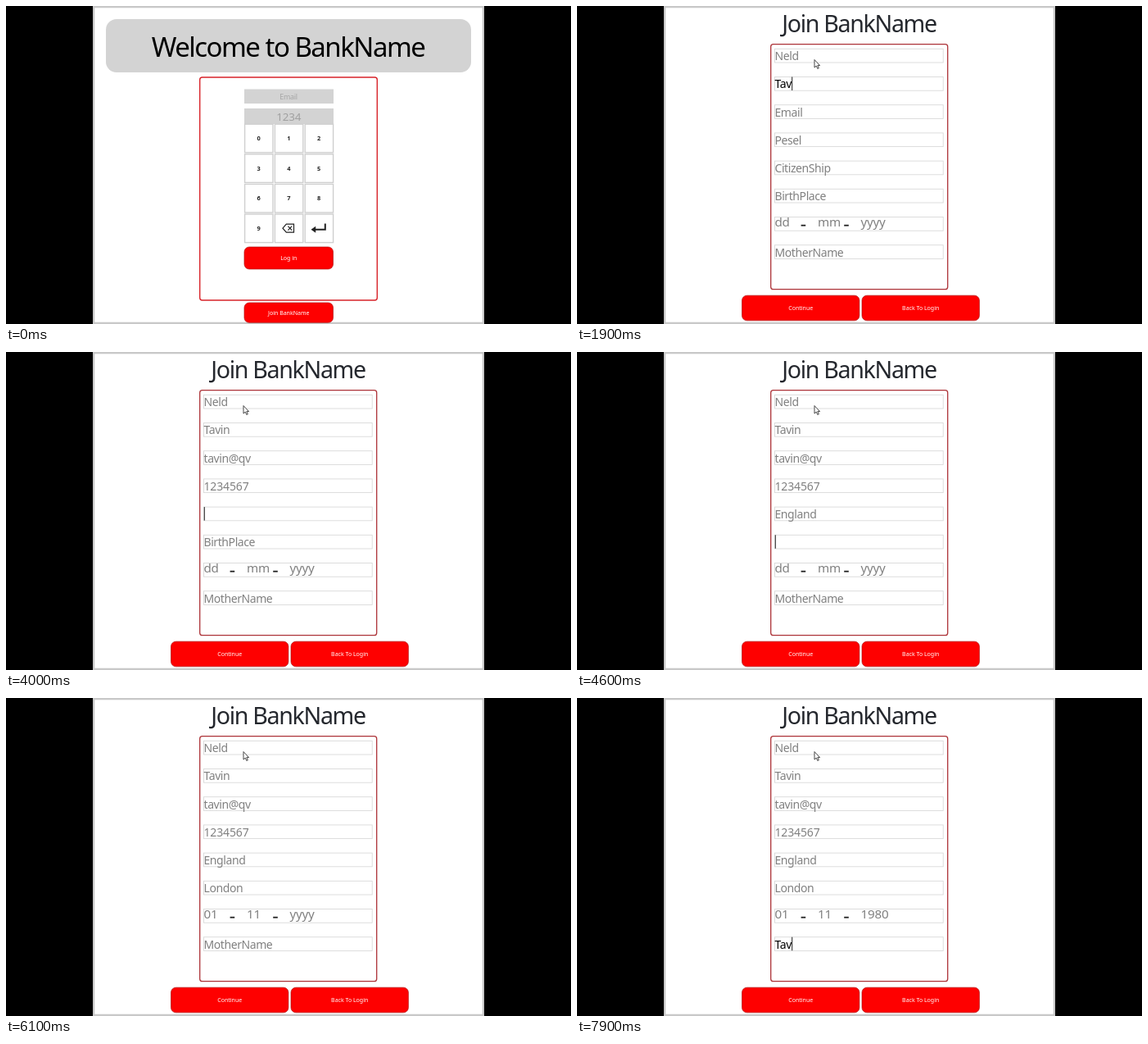
An HTML page for the animation above (8000 ms loop, 690 px wide and 388 px high).

```html
<!DOCTYPE html>
<html lang="en">
<head>
<meta charset="utf-8">
<title>Sign-up form</title>
<style>
  html, body { margin: 0; width: 100%; height: 100%; overflow: hidden; background: #000; }
  svg { display: block; width: 690px; height: 388px; }
  text { font-family: "Noto Sans", "Open Sans", sans-serif; letter-spacing: -.03em; white-space: pre; }
  .mid { text-anchor: middle; }
  .title { letter-spacing: -.046em; }
  .label { font-size: 7px; letter-spacing: 0; fill: #fff; }
  .key { font-size: 7.4px; font-weight: 600; letter-spacing: 0; fill: #222; }
  .entry { font-size: 14px; }
  .digits { letter-spacing: -.01em; }
  .date { font-size: 15.2px; letter-spacing: -.012em; fill: #808080; }
  .dash { fill: #222; }
</style>
</head>
<body>
<svg id="stage" viewBox="0 0 690 388">
  <rect width="690" height="388"/>
  <rect x="106" width="478" height="388" fill="#c9c9c9"/>
  <rect x="108.3" y="2.3" width="473.4" height="383.4" fill="#fff"/>
  <g id="login"></g>
  <g id="join"></g>
  <path id="pointer" d="M0 0V9.6L2.2 7.6 3.8 11 5.3 10.3 3.8 7.1H6.6Z" fill="#fff" stroke="#333" stroke-width=".9"/>
</svg>
<script>
const LOOP = 8000, STEP = 100;
const $ = id => document.getElementById(id);
const login = $('login'), join = $('join'), pointer = $('pointer');

function add(parent, tag, attrs, content) {
  const el = document.createElementNS('http://www.w3.org/2000/svg', tag);
  for (const k in attrs) el.setAttribute(k, attrs[k]);
  if (content) el.textContent = content;
  parent.append(el);
  return el;
}
const box = (parent, x, y, width, height, attrs) =>
  add(parent, 'rect', { x, y, width, height, ...attrs });
const label = (parent, x, y, content, attrs) =>
  add(parent, 'text', { x, y, ...attrs }, content);

function button(parent, x, y, w, h, content) {
  box(parent, x, y, w, h, { rx: 6, fill: '#fe0000', stroke: '#b01010', 'stroke-width': .7 });
  label(parent, x + w / 2, y + h / 2 + 2.5, content, { class: 'label mid' });
}

function buildLogin() {
  box(login, 122, 16, 446, 65, { rx: 13, fill: '#d3d3d3' });
  label(login, 344.5, 61.7, 'Welcome to BankName', { class: 'mid title', 'font-size': 33 });
  box(login, 236.7, 87, 216.6, 272, { rx: 3, fill: 'none', stroke: '#d8232a', 'stroke-width': 1.4 });
  box(login, 291, 101.5, 109, 17.5, { fill: '#d3d3d3' });
  label(login, 345, 113.5, 'Email', { class: 'mid', 'font-size': 8.9, fill: '#a6a6a6' });
  box(login, 291, 125, 109, 19, { fill: '#d3d3d3' });
  label(login, 345.3, 139.5, '1234', { class: 'mid digits', 'font-size': 13.4, fill: '#a0a0a0' });
  for (let i = 0; i < 12; i++) {
    const x = 291.6 + i % 3 * 36.8, y = 144.2 + Math.floor(i / 3) * 36.6;
    box(login, x, y, 34.4, 34.6, { fill: '#fff', stroke: '#cfcfcf', 'stroke-width': 1.4 });
    if (i < 10) label(login, x + 17, y + 20, String(i), { class: 'key mid' });
  }
  const line = { fill: 'none', stroke: '#222', 'stroke-width': 1.2 };
  add(login, 'path', { ...line, d: 'M338 271.2L342.3 266.2H351.5V276.2H342.3ZM344.4 268.7L349.2 273.7M349.2 268.7L344.4 273.7' });
  add(login, 'path', { ...line, 'stroke-width': 2, d: 'M389.8 265.5V272.8H376' });
  add(login, 'path', { fill: '#222', d: 'M372.5 272.8L378.2 268.8V276.8Z' });
  button(login, 291, 294, 108.5, 27, 'Log in');
  button(login, 291, 362, 108.5, 24.3, 'Join BankName');
}

// Text fields: form row, placeholder, value, focus and leave times, time of each character
const entries = [
  [0, 'FirstName', 'Neld', 1100, 1600, [1200, 1300, 1400, 1500]],
  [1, 'SecondName', 'Tavin', 1600, 2300, [1700, 1800, 1900, 2000, 2100]],
  [2, 'Email', 'tavin@qv', 2300, 3300, [2400, 2600, 2700, 2800, 3000, 3100, 3200, 3200]],
  [3, 'Pesel', '1234567', 3300, 4000, [3500, 3600, 3600, 3700, 3700, 3800, 3800]],
  [4, 'CitizenShip', 'England', 4000, 4600, [4200, 4300, 4300, 4400, 4400, 4500, 4500]],
  [5, 'BirthPlace', 'London', 4600, 5200, [4800, 4900, 4900, 5000, 5100, 5100]],
  [7, 'MotherName', 'Tav', 7700, LOOP, [7800, 7800, 7900]]
].map(([row, hint, value, start, end, keys]) => ({ row, hint, value, start, end, keys }));

// Date parts overwrite their mask one character at a time
const dates = [
  [241.4, 'dd', '01', 5200, 5800, [5400, 5700]],
  [294, 'mm', '11', 5800, 6200, [5900, 6100]],
  [346.4, 'yyyy', '1980', 6200, 7700, [6500, 6700, 7100, 7400]]
].map(([x, mask, value, start, end, keys]) => ({ x, mask, value, start, end, keys }));

const FIELD_X = 241.5;
const rowTop = row => 52.3 + row * 34.2;
let caret, block;

function buildJoin() {
  label(join, 344.5, 32, 'Join BankName', { class: 'mid title', 'font-size': 28.6, fill: '#24272d' });
  box(join, 236.7, 46.7, 216, 299, { rx: 3, fill: 'none', stroke: '#ad3338', 'stroke-width': 1.3 });
  for (let row = 0; row < 8; row++)
    box(join, FIELD_X, rowTop(row), 205.7, 16.7, { fill: '#fff', stroke: '#d9d9d9', 'stroke-width': .9 });
  for (const e of entries)
    e.el = label(join, FIELD_X, rowTop(e.row) + 13.8, '', { class: 'entry' });
  for (const d of dates) d.el = label(join, d.x, 269.1, '', { class: 'date' });
  for (const x of [273.6, 326.2]) box(join, x, 266.8, 5.6, 1.8, { class: 'dash' });
  block = box(join, 0, 254, 0, 19, { fill: '#808080' });
  caret = box(join, 0, 0, 1, 16.5, { fill: '#222' });
  button(join, 201.5, 353.2, 143.4, 30.6, 'Continue');
  button(join, 348, 353.2, 143.4, 30.6, 'Back To Login');
}

const typed = (field, t) => field.keys.filter(k => k <= t).length;
const focused = (field, t) => t >= field.start && t < field.end;
const show = (el, on) => el.setAttribute('visibility', on ? 'inherit' : 'hidden');
const place = (el, attrs) => { for (const k in attrs) el.setAttribute(k, attrs[k]); };

function drawEntries(t) {
  show(caret, false);
  for (const e of entries) {
    const active = focused(e, t);
    const content = t < e.start ? e.hint : e.value.slice(0, typed(e, t));
    e.el.textContent = content;
    e.el.setAttribute('fill', active ? '#000' : '#808080');
    e.el.classList.toggle('digits', /^\d/.test(content));
    if (!active) continue;
    const width = content ? e.el.getComputedTextLength() : 0;
    place(caret, { x: FIELD_X + .3 + width, y: rowTop(e.row) });
    show(caret, t < 3100 || t >= 3300);
  }
}

function drawDates(t) {
  show(block, false);
  for (const d of dates) {
    const n = typed(d, t);
    d.el.textContent = d.value.slice(0, n) + d.mask.slice(n);
    if (!focused(d, t) || n === d.mask.length) continue;
    const before = n ? d.el.getSubStringLength(0, n) : 0;
    place(block, { x: d.x + before, width: d.el.getSubStringLength(n, 1) });
    show(block, true);
  }
}

function drawPointer(t) {
  const p = Math.min(1, Math.max(0, (t - 800) / 250));
  const k = p * p * (3 - 2 * p);
  pointer.setAttribute('transform', `translate(${363 - 73 * k} ${372.5 - 307 * k})`);
  show(pointer, t >= 700);
}

function draw(now) {
  const t = Math.floor(now % LOOP / STEP) * STEP;
  const joining = t >= 700;
  show(login, !joining);
  show(join, joining);
  drawEntries(t);
  drawDates(t);
  drawPointer(t);
}

buildLogin();
buildJoin();
draw(0);
let origin;
requestAnimationFrame(function tick(now) {
  origin ??= now;
  draw(now - origin);
  requestAnimationFrame(tick);
});
</script>
</body>
</html>
```
